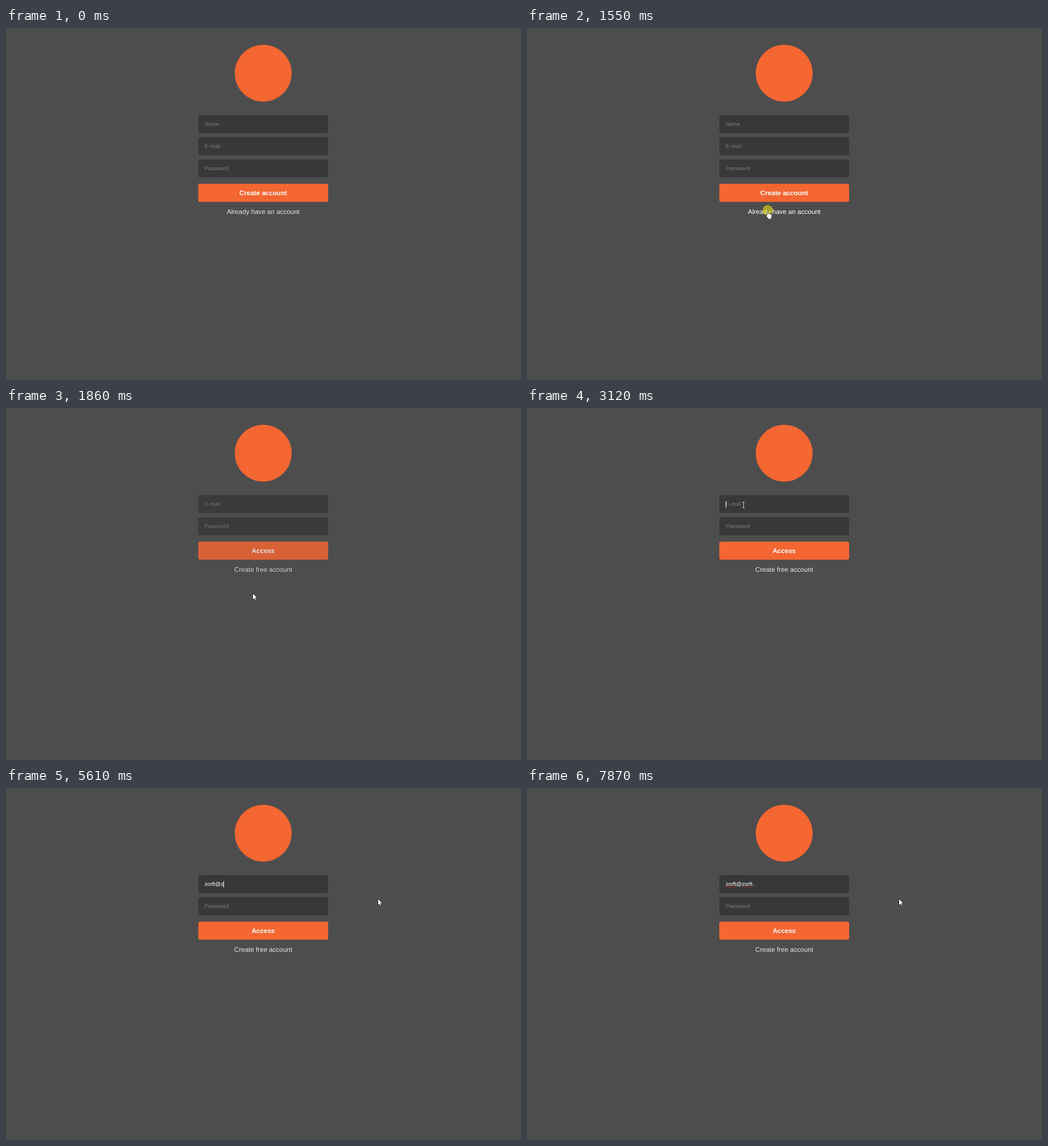
Recreate the animation shown at these times as an HTML page. Size 905 px wide and 619 px high, loop 8000 ms.

```html
<!DOCTYPE html>
<html lang="en">
<head>
<meta charset="utf-8">
<title>Sign in</title>
<style>
html, body { margin: 0; width: 100%; height: 100%; overflow: hidden; background: #4d4d4d; }
svg { display: block; }
text { font: 11.6px "Liberation Sans", Arial, sans-serif; text-rendering: geometricPrecision; white-space: pre; }
.mid { text-anchor: middle; }
.bold { font-weight: bold; }
.input { font-size: 9.65px; }
</style>
</head>
<body>
<svg id="stage" width="905" height="619" viewBox="0 0 905 619"></svg>
<script>
const stage = document.getElementById('stage');
const pen = document.createElement('canvas').getContext('2d');
pen.font = '9.65px "Liberation Sans", Arial, sans-serif';
const LOOP = 8000, STEP = 78.3, BLINK = 530, FOCUS = 3040, ORANGE = '#f46632';

// Pointer stops: arrival time, x, y, time of leaving
const stops = [
  [70, 821, 605], [300, 643, 447, 440], [1310, 423, 320.5, 1700], [1860, 433, 325],
  [2330, 373.5, 178.5], [2720, 373.5, 170.5, 2960], [3110, 380.5, 170.5],
  [3430, 759, 192], [3590, 653, 194]
];
const email = 'zorft@zorft.';
const keyTimes = [4130, 4440, 4520, 4680, 4830, 5150, 5610, 5690, 5850, 6000, 6320, 7330];

const clamp = v => Math.min(1, Math.max(0, v));
const ease = k => k * k * (3 - 2 * k);

function pointerAt(t) {
  const next = stops.findIndex(s => s[0] > t);
  const b = stops[next < 0 ? stops.length - 1 : next];
  const a = stops[next > 0 ? next - 1 : 0];
  const left = a[3] || a[0];
  const k = next < 0 ? 1 : ease(clamp((t - left) / (b[0] - left)));
  return [a[1] + (b[1] - a[1]) * k, a[2] + (b[2] - a[2]) * k];
}

const forms = {
  signUp: { fields: ['Name', 'E-mail', 'Password'], action: 'Create account', link: 'Already have an account', half: 64 },
  signIn: { fields: ['E-mail', 'Password'], action: 'Access', link: 'Create free account', half: 51 }
};
const rowY = i => 153 + i * 39;
const buttonY = form => rowY(form.fields.length) + 4;
const overLink = (form, [x, y]) =>
  Math.abs(x - 452) < form.half && Math.abs(y - buttonY(form) - 48) < 12;

const label = (x, y, s, cls, fill) =>
  `<text x="${x}" y="${y}" class="${cls}" fill="${fill}">${s}</text>`;
const box = (y, fill) =>
  `<rect x="337.9" y="${y}" width="228.2" height="31.8" rx="3.5" fill="${fill}"/>`;

function drawForm(form, typed, opacity, pos) {
  const y = buttonY(form);
  const rows = form.fields.map((name, i) => {
    const value = i ? '' : typed;
    return box(rowY(i), '#383838') +
      label(349, rowY(i) + 19.2, value || name, 'input', value ? '#fff' : '#7b7b7b');
  });
  return `<g opacity="${opacity}">${rows.join('')}${box(y, ORANGE)}` +
    label(452, y + 19.5, form.action, 'mid bold', '#fff') +
    label(452, y + 52.5, form.link, 'mid', overLink(form, pos) ? '#fff' : '#e6e6e6') + '</g>';
}

const pointers = {
  arrow: '<path d="M.5.5V12.4L3.1 10L5 14L6.9 13.2L5 9.2H8.7Z" fill="#fff" stroke="#000" stroke-width=".7"/>',
  hand: '<path d="M-1 1Q0-.5 1 1V6L5.5 7Q7.5 7.5 7.5 9.5L6.5 13V15.5H.5V14L-3 9.5Q-3 8-1 9Z" fill="#fff" stroke="#222" stroke-width=".7"/>',
  beam: '<path d="M-2-5H2M0-5V5M-2 5H2" fill="none" stroke="#ccc"/>'
};

function pointerKind(form, pos) {
  const [x, y] = pos, down = y - buttonY(form);
  const inside = Math.abs(x - 452) < 114;
  if (overLink(form, pos) || inside && down >= 0 && down < 32) return 'hand';
  return inside && y >= 153 && down < -11 && (y - 153) % 39 < 32 ? 'beam' : 'arrow';
}

function squiggle(from, to) {
  const waves = 'l1.5-1l1.5 1'.repeat(Math.round((to - from) / 3));
  return `<path d="M${from} 174.8${waves}" fill="none" stroke="#d22" stroke-width=".6"/>`;
}

function draw(t) {
  // The screen refreshes in even steps
  const now = 450 + STEP * Math.floor((t - 440) / STEP + 0.2);
  const pos = pointerAt(now);
  const form = t < 1630 ? forms.signUp : forms.signIn;
  const fade = t < 1630 ? 1 : 1 - (1 - clamp((now - 1590) / 360)) ** (4 / 3);
  const pressed = keyTimes.filter(k => k <= t);
  const typed = email.slice(0, pressed.length);
  const end = n => 349 + pen.measureText(email.slice(0, n)).width;

  let out = `<circle cx="452" cy="79.5" r="50" fill="${ORANGE}"/>` + drawForm(form, typed, fade, pos);
  if (typed === email) out += squiggle(349, end(5)) + squiggle(end(6), end(11));

  const idle = t - (pressed.pop() || FOCUS);
  if (idle >= 0 && idle / BLINK % 2 < 1)
    out += `<rect x="${Math.floor(end(typed.length))}" y="164" width="1" height="11" fill="#fff"/>`;
  if ([1550, 2960].some(c => t >= c && t < c + 80))
    out += `<circle cx="${pos[0]}" cy="${pos[1]}" r="9" fill="#ff0" opacity=".5"/>`;
  if (t >= 70) out += `<g transform="translate(${pos})">${pointers[pointerKind(form, pos)]}</g>`;
  stage.innerHTML = out;
}

const start = performance.now();
function tick() {
  draw((performance.now() - start) % LOOP);
  requestAnimationFrame(tick);
}
tick();
</script>
</body>
</html>
```
